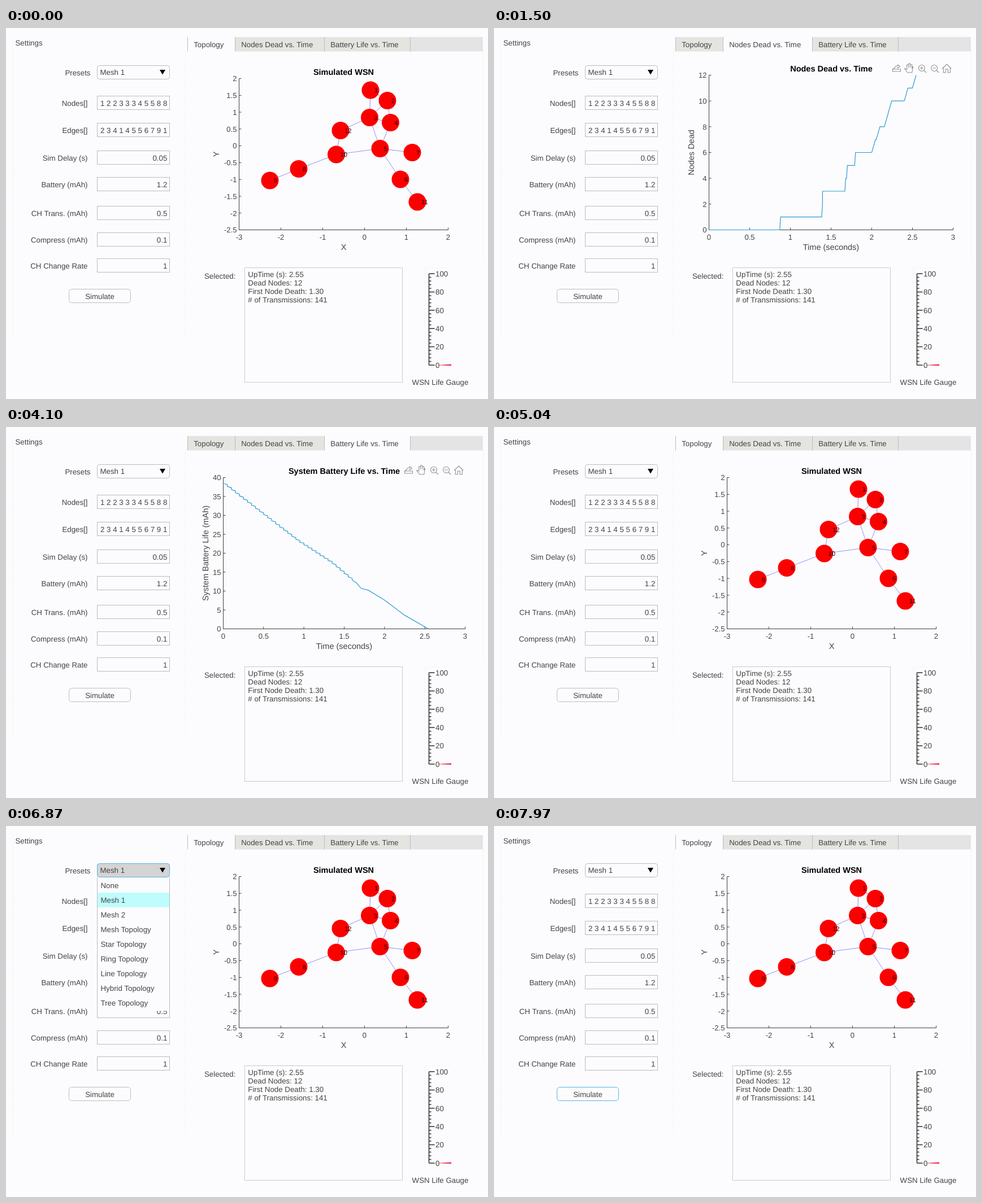
Write an HTML page that moves like this. It is 853x657 px and loops after 8000 ms.

```html
<!DOCTYPE html>
<html lang="en">
<head>
<meta charset="utf-8">
<title>WSN simulator</title>
<style>
html, body { margin: 0; width: 100%; height: 100%; overflow: hidden; background: #fcfcfe; }
svg { display: block; width: 853px; height: 657px; font: 13.3px "Liberation Sans", Arial, sans-serif; text-rendering: geometricPrecision; }
text { fill: #444; white-space: pre; }
.title { font-size: 14.5px; font-weight: bold; fill: #000; }
.axis { font-size: 14.5px; }
.tick { font-size: 13.1px; }
.node { font-size: 11.3px; fill: #280000; }
.line { fill: none; stroke: #404040; }
.gauge { fill: none; stroke: #303030; stroke-width: 1.5; }
.plot { fill: none; stroke: #2f9bd0; stroke-width: 1.2; }
.edge { fill: none; stroke: #9292f2; }
.box { fill: #fcfcfe; stroke: #bcbabf; }
.faint { fill: none; stroke: #efefe6; stroke-dasharray: 2 2; }
.icon { fill: none; stroke: #909090; stroke-width: 1.1; }
</style>
</head>
<body>
<svg id="stage" viewBox="0 0 853 657"></svg>
<script>
const LOOP = 8000;
const sources = '1 2 2 3 3 3 4 5 5 8 8 10 10 12 6';
const targets = '2 3 4 1 4 5 5 6 7 9 10 5 12 3 11';

const text = (x, y, s, anchor = 'start', cls = '', extra = '') =>
  `<text x="${x}" y="${y}" text-anchor="${anchor}" class="${cls}" ${extra}>${s}</text>`;
const path = (d, cls = 'line') => `<path d="${d}" class="${cls}"/>`;
const rect = (x, y, w, h, attrs) => `<rect x="${x}" y="${y}" width="${w}" height="${h}" ${attrs}/>`;
const poly = pts => 'M' + pts.map(p => p.map(v => +v.toFixed(2)).join(' ')).join('L');
const group = (id, body) => `<g id="${id}">${body}</g>`;
const range = (a, b, step) =>
  Array.from({ length: Math.round((b - a) / step) + 1 }, (_, i) => +(a + i * step).toFixed(2));

function settings() {
  const field = (name, value, y) => text(144.5, y + 17.3, name, 'end') +
    rect(161.5, y, 128, 24, 'class="box"') + text(285.3, y + 17.3, value, 'end');
  return path('M12.5 16V556M317.5 40V552M844.5 42V418', 'faint') +
    text(16.5, 31.3, 'Settings') + text(149.5, 84, 'Presets', 'end') +
    field('Nodes[]', sources.slice(0, 21), 120.5) + field('Edges[]', targets.slice(0, 21), 168.5) +
    field('Sim Delay (s)', '0.05', 217.5) + field('Battery (mAh)', '1.2', 264.5) +
    field('CH Trans. (mAh)', '0.5', 315.5) + field('Compress (mAh)', '0.1', 362.5) +
    field('CH Change Rate', '1', 408.5) +
    rect(161.5, 66.5, 128, 24, 'rx="4" class="box" id="preset"') +
    text(166.5, 83.3, 'Mesh 1') + '<path d="M272 74h10l-5 8.5z"/>' +
    rect(111.5, 462.5, 109, 24, 'rx="5" class="box" id="simulate"') +
    text(166, 479.5, 'Simulate', 'middle');
}

function menu() {
  const kinds = ['Mesh', 'Star', 'Ring', 'Line', 'Hybrid', 'Tree'].map(s => s + ' Topology');
  return rect(161, 91, 129, 236.5, 'fill="#fcfcfe"') + path('M161.5 91V327M289.5 91V327', 'box') +
    rect(162, 118, 127, 26, 'fill="#bffcfd"') +
    ['None', 'Mesh 1', 'Mesh 2', ...kinds].map((s, i) => text(167.5, 109.6 + i * 26.1, s)).join('');
}

function results() {
  const y = v => 597 - v * 1.62;
  const lines = ['UpTime (s): 2.55', 'Dead Nodes: 12', 'First Node Death: 1.30', '# of Transmissions: 141'];
  return text(351, 444, 'Selected:') +
    rect(422.5, 424.5, 279, 203, 'class="box" style="stroke:#c9c9d6"') +
    lines.map((s, i) => text(428.3, 440.6 + i * 15.05, s)).join('') +
    path('M788 424.5H741.5V607', 'faint') +
    path(`M748.5 ${y(100)}V${y(0)}` +
      range(0, 100, 4).map(v => `M748.5 ${y(v)}h${v % 20 ? 4 : 10}`).join(''), 'gauge') +
    range(0, 100, 20).map(v => text(760, y(v) + 4.7, v)).join('') +
    '<path d="M761 597L788 595.3V598.3Z" fill="#f0405c"/>' +
    text(768.5, 632, 'WSN Life Gauge', 'middle');
}

// Axes with inward ticks; x and y hold [min, max, step]
function chart({ left, right = 812.5, top = 89.5, x = [0, 3, .5], y, title, titleX, xName = 'Time (seconds)', yName, yNameX }) {
  const bottom = 357.5;
  const px = v => left + (v - x[0]) / (x[1] - x[0]) * (right - left);
  const py = v => bottom - (v - y[0]) / (y[1] - y[0]) * (bottom - top);
  const xs = range(...x), ys = range(...y);
  const frame = path(`M${left} ${top}V${bottom}H${right}` +
      xs.map(v => `M${px(v)} ${bottom}v-4`).join('') + ys.map(v => `M${left} ${py(v)}h4`).join('')) +
    xs.map(v => text(px(v), 375, v, 'middle', 'tick')).join('') +
    ys.map(v => text(left - 4, py(v) + 4.8, v, 'end', 'tick')).join('') +
    text(titleX, top - 6.5, title, 'middle', 'title') +
    text((left + right) / 2, 393.3, xName, 'middle', 'axis') +
    text(0, 0, yName, 'middle', 'axis', `transform="translate(${yNameX} ${(top + bottom) / 2}) rotate(-90)"`);
  return { frame, plot: pts => path(poly(pts.map(([a, b]) => [px(a), py(b)])), 'plot') };
}

function toolbar(y) {
  const lens = 'M4 4L8 8M5.5 0A5.5 5.5 0 1 1 -5.5 0A5.5 5.5 0 1 1 5.5 0M-3 0H3';
  const icons = [
    'M-7 2V6H7V2ZL-3 -1Q-3 -4 2 -4V-6L6 -3L2 0V-2',
    'M-3 8L-8 1L-4 2V-6H-1V-1V-8H2V-1V-6H5V0L7 -3L5 8Z',
    lens + 'M0 -3V3',
    lens,
    'M-8 1L0 -7L8 1M-6 0V8H-2V2H2V8H6V0'
  ];
  return icons.map((d, i) =>
    `<path class="icon" transform="translate(${712.5 + i * 22.2} ${y})" d="${d}"/>`).join('');
}

function topology() {
  const nodes = [[645, 110], [675, 128.5], [643.5, 158.5], [680.5, 167.5], [662, 213.5], [698, 268],
    [719, 220.5], [518, 249.5], [467, 270], [584.5, 224], [728, 308], [592, 181.5]];
  const ends = targets.split(' ');
  const edges = sources.split(' ').map((a, i) => poly([nodes[a - 1], nodes[ends[i] - 1]]));
  const { frame } = chart({
    left: 412.5, right: 782.5, x: [-3, 2, 1], y: [-2.5, 2, .5],
    title: 'Simulated WSN', titleX: 597.5, xName: 'X', yName: 'Y', yNameX: 377
  });
  return frame + path(edges.join(''), 'edge') +
    nodes.map(([x, y]) => `<circle cx="${x}" cy="${y}" r="15.5" fill="#fc0000"/>`).join('') +
    nodes.map(([x, y], i) => text(x + 7, y + 4.2, i + 1, 'start', 'node')).join('');
}

// The count climbs to each death; the late ones climb more slowly
function deadNodes() {
  const deaths = [.88, 1.395, 1.395, 1.68, 1.7, 1.8, 2.045, 2.1, 2.2, 2.245, 2.445, 2.545];
  const { frame, plot } = chart({
    left: 380.5, top: 83.5, y: [0, 12, 2],
    title: 'Nodes Dead vs. Time', titleX: 597, yName: 'Nodes Dead', yNameX: 354
  });
  const climb = (t, i) => [[Math.max(deaths[i - 1] || 0, t - (t > 2 ? .045 : .01)), i], [t, i + 1]];
  return frame + toolbar(71) + plot([[0, 0], ...deaths.flatMap(climb)]);
}

// The level falls between a few knots, in small stairs until most nodes are gone
function battery() {
  const { frame, plot } = chart({
    left: 384.5, y: [0, 40, 5],
    title: 'System Battery Life vs. Time', titleX: 598.5, yName: 'System Battery Life (mAh)', yNameX: 358
  });
  const knots = [[0, 38.7], [.93, 23.4], [1.35, 17.6], [1.65, 12.2], [1.71, 10.7], [1.8, 10.2],
    [2, 7.6], [2.25, 3.6], [2.545, 0]];
  const level = t => {
    const i = Math.max(1, knots.findIndex(k => k[0] >= t));
    const [[t0, v0], [t1, v1]] = [knots[i - 1], knots[i]];
    return v0 + (v1 - v0) * (t - t0) / (t1 - t0);
  };
  const stairs = range(.05, 1.6, .05).flatMap(t => [[t, level(t) + .25], [t, level(t) - .25]]);
  return frame + toolbar(76) + plot([[.01, 38.4], ...stairs, ...knots.slice(3)]);
}

const tabEdges = [322, 406, 564, 716];
const tabs = () => rect(322, 16, 394, 25.5, 'fill="#e4e4e0"') +
  rect(716, 16, 128, 25.5, 'fill="#e4e4e5"') +
  path(tabEdges.map(x => `M${x - .5} 16V41.5`).join(''), 'box') +
  rect(0, 15.5, 0, 26.5, 'fill="#fcfcfe" id="active"') +
  ['Topology', 'Nodes Dead vs. Time', 'Battery Life vs. Time']
    .map((s, i) => text(tabEdges[i] + 10.2, 34, s)).join('');

const $ = id => document.getElementById(id);
$('stage').innerHTML = settings() + results() + tabs() + group('page0', topology()) +
  group('page1', deadNodes()) + group('page2', battery()) + group('menu', menu());

const show = (id, on) => $(id).setAttribute('visibility', on ? 'visible' : 'hidden');
const between = (t, a, b) => t >= a && t < b;

function draw(now) {
  const t = now % LOOP;
  const tab = between(t, 1430, 3120) ? 1 : between(t, 3120, 4700) ? 2 : 0;
  for (let i = 0; i < 3; i++) show('page' + i, i === tab);
  $('active').setAttribute('x', tabEdges[tab]);
  $('active').setAttribute('width', tabEdges[tab + 1] - tabEdges[tab] - 1);

  show('menu', between(t, 5880, 6880));
  $('preset').style.fill = between(t, 5820, 6900) ? '#d4d4d5' : '';
  $('preset').style.stroke = between(t, 5850, 7870) ? '#58b4e4' : '';
  $('simulate').style.stroke = t >= 7600 ? '#58b4e4' : '';
  $('simulate').style.fill = between(t, 7870, 7940) ? '#d4d4d5' : '';
  requestAnimationFrame(() => draw(performance.now()));
}
draw(0);
</script>
</body>
</html>
```
